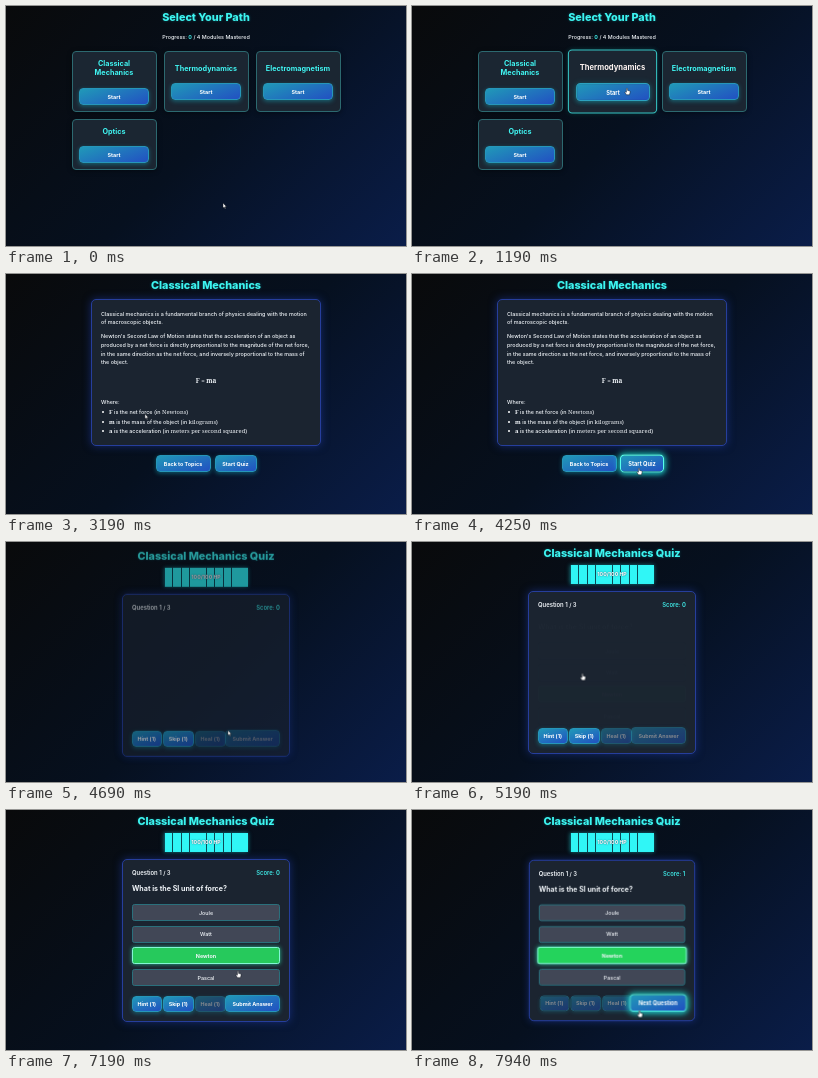
Write an HTML page that moves like this. It is 400x240 px and loops after 8000 ms.

```html
<!DOCTYPE html>
<html lang="en">
<head>
<meta charset="utf-8">
<title>Physics learning path</title>
<style>
@property --h { syntax: "<number>"; inherits: false; initial-value: 0; }
* { box-sizing: border-box; margin: 0; }
html, body { width: 100%; height: 100%; overflow: hidden; background: #070b12; }
#stage {
  position: relative; width: 400px; height: 240px; overflow: hidden;
  background: linear-gradient(135deg, #090a0b, #06101f 52%, #0a1d49);
  font: 500 5.4px Inter, sans-serif; color: #f2f6fa;
}
#stage * { animation: 8s linear infinite; }
#stage div, #stage p, #stage button, #stage svg { position: absolute; }
.page { inset: 0; }
p { line-height: 10px; margin-top: -5px; white-space: pre; }
.mid { left: 0; width: 100%; text-align: center; }
.title { font-size: 10.8px; font-weight: 800; color: #3df5f0; text-shadow: 0 0 3px #16c6d855; }
.cyan { color: #3fe9e6; }
b { font-weight: 700; }

.card {
  width: 85px; height: 61px; border-radius: 4px;
  background: #1b2632; color: rgb(calc(64 + 191 * var(--h)) 245 242);
  border: 1px solid rgb(calc(44 + 10 * var(--h)) calc(105 + 90 * var(--h)) calc(112 + 83 * var(--h)));
  box-shadow: 0 1px 5px rgb(0 0 0 / .4), 0 0 5px rgb(40 220 220 / calc(.25 * var(--h)));
  transform: scale(calc(1 + .05 * var(--h)));
}
.card p { font-size: 7.25px; font-weight: 700; }
.card button { left: 6.5px; width: 70px; }

button {
  height: 17px; padding: 0; border-radius: 4px; white-space: nowrap;
  font: 700 5.4px Inter, sans-serif; color: #fff;
  background: linear-gradient(160deg, #2099b8, #2250c2);
  border: 1px solid rgb(calc(38 + 50 * var(--h)) calc(150 + 105 * var(--h)) calc(185 + 50 * var(--h)));
  box-shadow: 0 1.5px 4px rgb(25 170 190 / .45),
    0 0 6px 1.5px rgb(35 245 225 / calc(.75 * var(--h)));
  transform: scale(calc(1 + .05 * var(--h)));
}

.panel {
  background: #1b2430; border: 1px solid #263e9c; border-radius: 5px;
  box-shadow: 0 0 8px #2140b088;
}
.math { font-family: "Noto Serif", serif; font-size: 5.8px; }
.dot::before { content: ""; position: absolute; left: -7px; top: 4px; width: 2px; height: 2px; border-radius: 50%; background: #fff; }

.bar {
  left: 158px; top: 23px; width: 84px; height: 18.5px;
  background: repeating-linear-gradient(90deg, #0c4a56 0 .9px, #30f6f6 .9px 8.4px);
  box-shadow: 0 0 4px #20d8e088;
}
.bar p { top: 9px; font-size: 5.2px; font-weight: 800; text-shadow: 0 0 1.5px #145a66; }

.option {
  left: 9px; width: 148px; height: 17px; border-radius: 2.5px;
  background: rgb(calc(65 - 12 * var(--h)) calc(71 + 25 * var(--h)) calc(86 + 22 * var(--h)));
  border: 1px solid rgb(calc(42 + 10 * var(--h)) calc(112 + 70 * var(--h)) calc(124 + 60 * var(--h)));
}
.option p { top: 7.5px; }
.dim { opacity: .45; }

#topics { animation-name: show-topics; }
#learn { animation-name: show-learn; }
#quiz { animation-name: show-quiz; }
#quiz-panel { animation-name: pulse; }
#question { inset: 0; animation-name: show-question; }
#thermo { animation-name: hover-thermo; }
#thermo button { animation-name: hover-thermo-start; }
#classical { animation-name: hover-classical; }
#classical button { animation-name: hover-classical-start; }
#start-quiz { animation-name: hover-quiz; }
#watt { animation-name: hover-watt; }
#newton { animation-name: hover-newton, correct; }
#submit { animation-name: hover-submit, enable; }
#stage .before { animation-name: before-answer; animation-timing-function: step-end; }
#stage .after { animation-name: after-answer; animation-timing-function: step-end; }
#stage .help { animation-name: lock; animation-timing-function: step-end; }
#cursor { left: 0; top: 0; width: 8px; height: 9px; overflow: visible; animation-name: move; animation-timing-function: ease-in-out; }
#arrow { animation-name: arrow; animation-timing-function: step-end; }
#hand { animation-name: hand; animation-timing-function: step-end; }

@keyframes show-topics { 0%, 32.7% { opacity: 1 } 32.8%, 100% { opacity: 0 } }
@keyframes show-learn {
  0%, 32.8% { opacity: 0; transform: translateY(7px); animation-timing-function: ease-out }
  39%, 56% { opacity: 1; transform: none }
  56.1%, 100% { opacity: 0; transform: none }
}
@keyframes show-quiz {
  0%, 56.1% { opacity: 0; transform: translateY(7px); animation-timing-function: ease-out }
  62%, 100% { opacity: 1; transform: none }
}
@keyframes show-question {
  0%, 64.3% { opacity: 0; transform: translateY(6.5px); animation-timing-function: ease-in-out }
  70.5%, 100% { opacity: 1; transform: none }
}
@keyframes hover-thermo { 0%, 11.3% { --h: 0 } 14.8%, 20.6% { --h: 1 } 24.4%, 100% { --h: 0 } }
@keyframes hover-thermo-start { 0%, 14.5% { --h: 0 } 17.8%, 19.3% { --h: 1 } 23%, 100% { --h: 0 } }
@keyframes hover-classical { 0%, 23.8% { --h: 0 } 27.5%, 100% { --h: 1 } }
@keyframes hover-classical-start { 0%, 26.3% { --h: 0 } 30%, 100% { --h: 1 } }
@keyframes hover-quiz { 0%, 49.3% { --h: 0 } 53%, 100% { --h: 1 } }
@keyframes hover-watt { 0%, 74% { --h: 0 } 77.5%, 83% { --h: 1 } 86%, 100% { --h: 0 } }
@keyframes hover-newton { 0%, 83% { --h: 0 } 86%, 100% { --h: 1 } }
@keyframes hover-submit { 0%, 91% { --h: 0 } 94.5%, 100% { --h: 1 } }
@keyframes correct {
  0%, 93.5% { transform: none }
  97%, 100% {
    transform: scale(1.02); background: #24d35c; border-color: #8affdc;
    box-shadow: 0 0 5px #30ffc0bb; font-weight: 700;
  }
}
@keyframes enable { 0%, 86.5% { opacity: .45 } 89%, 100% { opacity: 1 } }
@keyframes before-answer { 0% { opacity: 1 } 93.5%, 100% { opacity: 0 } }
@keyframes after-answer { 0% { opacity: 0 } 93.5%, 100% { opacity: 1 } }
@keyframes lock { 93.5%, 100% { opacity: .45; transform: translateX(1px) } }
@keyframes pulse { 0%, 93.5% { transform: none } 96% { transform: scale(1.012) } 99%, 100% { transform: scale(.99) } }
@keyframes move {
  0%, 3% { transform: translate(217px, 197px) }
  14.8%, 17% { transform: translate(215px, 82px) }
  29%, 33% { transform: translate(112px, 86.5px) }
  41% { transform: translate(140px, 142px) }
  52%, 57% { transform: translate(227px, 194px) }
  64.8%, 67% { transform: translate(170.5px, 131.5px) }
  79%, 81% { transform: translate(248.5px, 123.5px) }
  85.5%, 88% { transform: translate(232px, 146px) }
  93%, 95% { transform: translate(232px, 196px) }
  99%, 100% { transform: translate(227.5px, 200.5px) }
}
@keyframes arrow {
  0% { opacity: 1 } 14.4% { opacity: 0 } 20.5% { opacity: 1 } 26% { opacity: 0 }
  32.8% { opacity: 1 } 49.3% { opacity: 0 } 56.1% { opacity: 1 } 62%, 100% { opacity: 0 }
}
@keyframes hand {
  0% { opacity: 0 } 14.4% { opacity: 1 } 20.5% { opacity: 0 } 26% { opacity: 1 }
  32.8% { opacity: 0 } 49.3% { opacity: 1 } 56.1% { opacity: 0 } 62%, 100% { opacity: 1 }
}
</style>
</head>
<body>
<main id="stage">
  <div id="topics" class="page">
    <p class="mid title" style="top:11.5px">Select Your Path</p>
    <p class="mid" style="top:31px">Progress: <b class="cyan">0</b> / 4 Modules Mastered</p>
    <div id="classical" class="card" style="left:65.5px;top:45px">
      <p class="mid" style="top:12px">Classical</p>
      <p class="mid" style="top:21.3px">Mechanics</p>
      <button style="top:36px">Start</button>
    </div>
    <div id="thermo" class="card" style="left:157.5px;top:45px">
      <p class="mid" style="top:16.5px">Thermodynamics</p>
      <button style="top:31px">Start</button>
    </div>
    <div class="card" style="left:249.5px;top:45px">
      <p class="mid" style="top:16.5px">Electromagnetism</p>
      <button style="top:31px">Start</button>
    </div>
    <div class="card" style="left:65.5px;top:113px;height:51px">
      <p class="mid" style="top:12px">Optics</p>
      <button style="top:26px">Start</button>
    </div>
  </div>

  <div id="learn" class="page">
    <p class="mid title" style="top:11.5px">Classical Mechanics</p>
    <div class="panel" style="left:85px;top:25px;width:230px;height:147px">
      <p style="left:9px;top:13.5px">Classical mechanics is a fundamental branch of physics dealing with the motion</p>
      <p style="left:9px;top:22px">of macroscopic objects.</p>
      <p style="left:9px;top:36.3px">Newton's Second Law of Motion states that the acceleration of an object as</p>
      <p style="left:9px;top:45px">produced by a net force is directly proportional to the magnitude of the net force,</p>
      <p style="left:9px;top:53.7px">in the same direction as the net force, and inversely proportional to the mass of</p>
      <p style="left:9px;top:62.3px">the object.</p>
      <p class="mid math" style="top:80.5px;font-size:6.3px"><b>F</b> = <b>ma</b></p>
      <p style="left:9px;top:101.5px">Where:</p>
      <p class="dot" style="left:17px;top:112.3px"><b class="math">F</b> is the net force (in <span class="math">Newtons</span>)</p>
      <p class="dot" style="left:17px;top:121.8px"><b class="math">m</b> is the mass of the object (in <span class="math">kilograms</span>)</p>
      <p class="dot" style="left:17px;top:131.3px"><b class="math">a</b> is the acceleration (in <span class="math">meters per second squared</span>)</p>
    </div>
    <button style="left:149.5px;top:181px;width:55px">Back to Topics</button>
    <button id="start-quiz" style="left:208.5px;top:181px;width:42px">Start Quiz</button>
  </div>

  <div id="quiz" class="page">
    <p class="mid title" style="top:11.5px">Classical Mechanics Quiz</p>
    <div class="bar"><p class="mid">100/100 HP</p></div>
    <div id="quiz-panel" class="panel" style="left:116px;top:49px;width:168px;height:163px">
      <p style="left:9px;top:13px;font-size:5.9px;font-weight:600">Question 1 / 3</p>
      <p class="cyan before" style="right:9px;top:13px;font-size:5.9px;font-weight:600">Score: 0</p>
      <p class="cyan after" style="right:9px;top:13px;font-size:5.9px;font-weight:600">Score: 1</p>
      <div id="question">
        <p style="left:9px;top:29px;font-size:7.1px;font-weight:700">What is the SI unit of force?</p>
        <div class="option" style="top:44px"><p class="mid">Joule</p></div>
        <div id="watt" class="option" style="top:65.6px"><p class="mid">Watt</p></div>
        <div id="newton" class="option" style="top:87.3px"><p class="mid">Newton</p></div>
        <div class="option" style="top:109px"><p class="mid">Pascal</p></div>
      </div>
      <button class="help" style="left:9px;top:136px;width:29.5px;height:15.5px">Hint (1)</button>
      <button class="help" style="left:40px;top:136px;width:30.5px;height:15.5px">Skip (1)</button>
      <button class="help dim" style="left:72px;top:136px;width:30.5px;height:15.5px">Heal (1)</button>
      <button id="submit" style="left:102px;top:135px;width:55px">
        <p class="mid before" style="top:7.5px">Submit Answer</p>
        <p class="mid after" style="top:7.5px">Next Question</p>
      </button>
    </div>
  </div>

  <svg id="cursor" viewBox="0 0 8 9" fill="#fff" stroke="#10151c" stroke-width=".5" stroke-linejoin="round">
    <path id="arrow" d="M0 0V5L1.2 4 2 5.8 2.8 5.4 2 3.7H3.5Z"/>
    <path id="hand" d="M-.6 .5Q0 -.3 .6 .5V2.4L2.7 3Q3.3 3.3 3.1 4.2L2.5 6.8H-.5L-2 4.4Q-2 3.4 -.6 4.2Z"/>
  </svg>
</main>
</body>
</html>
```
